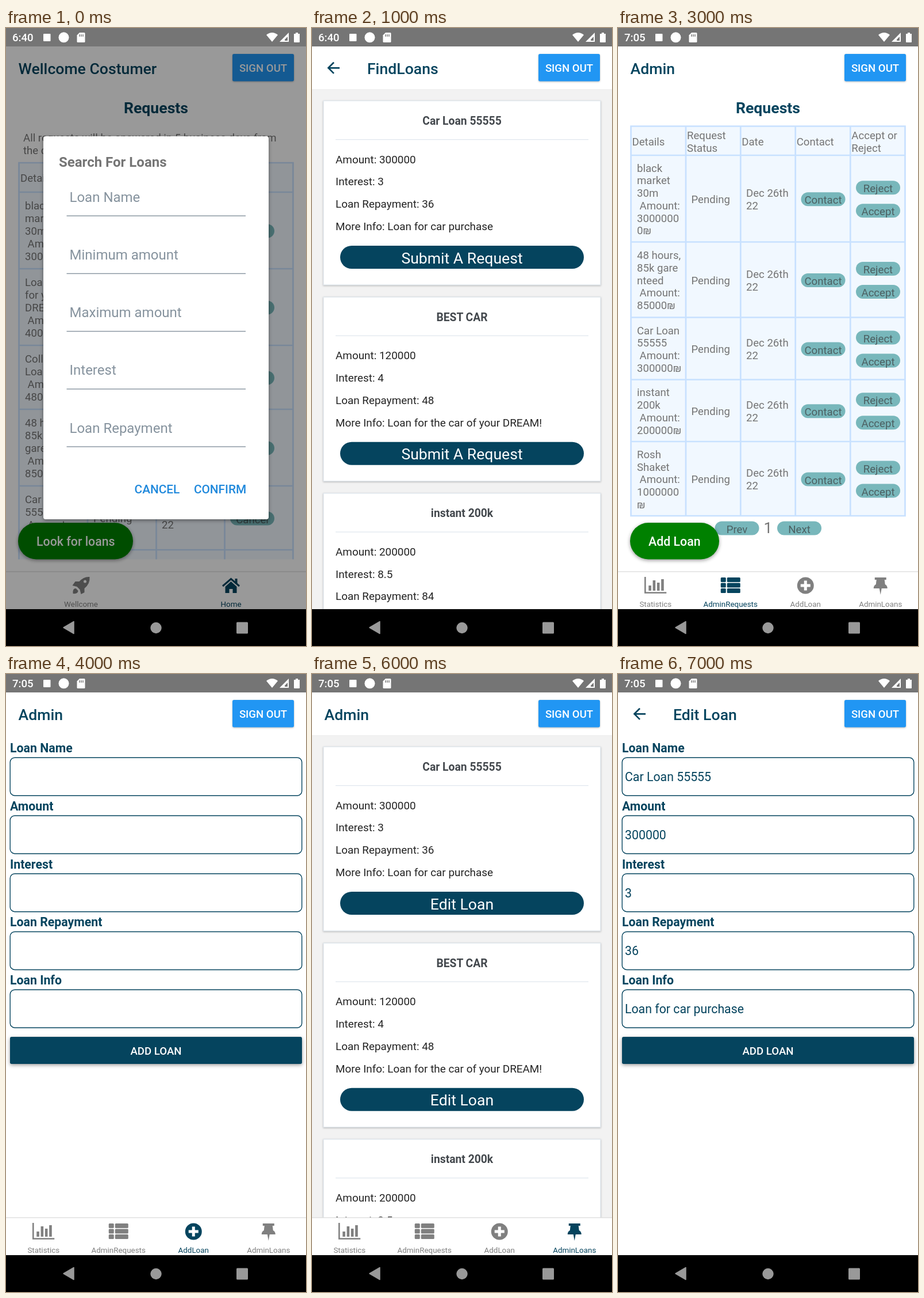
Write an HTML page that moves like this. It is 522 px wide and 1073 px high and loops after 8 s.

```html
<!DOCTYPE html>
<html lang="en">
<head>
<meta charset="utf-8">
<title>Loan app walkthrough</title>
<style>
  html, body { margin: 0; width: 100%; height: 100%; overflow: hidden; background: #fff; }
  svg { display: block; width: 522px; height: 1073px; }
  text { font-family: Roboto, "Noto Sans", sans-serif; white-space: pre; }
  .low { filter: drop-shadow(0 1px 1.5px #0004); }
  .mid { filter: drop-shadow(0 2px 3px #0006); }
  .high { filter: drop-shadow(0 8px 12px #0008); }
</style>
</head>
<body>
<svg id="stage" viewBox="0 0 522 1073"></svg>
<script>
const NAVY = '#05445e', GREY = '#757575', TEAL = '#78b7bb', PAPER = '#f2f2f2';

// Drawing helpers return SVG markup
const text = (x, y, s, size = 18.6, fill = GREY, weight = 400, anchor = 'start') =>
  `<text x="${x}" y="${y}" font-size="${size}" fill="${fill}" font-weight="${weight}" text-anchor="${anchor}">${s}</text>`;
const mid = (x, y, s, size, fill, weight) => text(x, y, s, size, fill, weight, 'middle');
const rect = (x, y, w, h, fill, r = 0, more = '') =>
  `<rect x="${x}" y="${y}" width="${w}" height="${h}" rx="${r}" fill="${fill}" ${more}/>`;
const circle = (x, y, r, fill) => `<circle cx="${x}" cy="${y}" r="${r}" fill="${fill}"/>`;
const path = (d, fill, more = '') => `<path d="${d}" fill="${fill}" ${more}/>`;
const line = (d, color, width) => path(d, 'none', `stroke="${color}" stroke-width="${width}"`);
const at = (x, y, body) => `<g transform="translate(${x} ${y})">${body}</g>`;
const each = (list, draw) => list.map(draw).join('');

const lines = (x, cy, rows, pitch = 21.7) =>
  each(rows, (s, i) => text(x, cy + 7.7 + (i - (rows.length - 1) / 2) * pitch, s));
const pill = (x, cy, label) =>
  rect(x, cy - 11.5, 77, 24, TEAL, 12) + mid(x + 38.5, cy + 8.6, label, 18.6, '#4c6062');

function grid(xs, ys) {
  const [left, right, top, bottom] = [xs[0], xs.at(-1), ys[0], ys.at(-1)];
  return rect(left, top, right - left, bottom - top, '#f1f8ff') +
    line(each(xs, x => `M${x} ${top - 1.3}V${bottom + 1.3}`) + each(ys, y => `M${left} ${y}H${right}`), '#c8e1ff', 2.7);
}

const status = time => rect(0, 0, 522, 32, GREY) + text(11, 23, time, 18.6, '#fff', 500) +
  rect(65, 10, 12.5, 13, '#fff', 1) + circle(100.5, 16.3, 9, '#fff') +
  path('M128 8h8q1.5 0 1.5 1.5v14q0 1.500-1.500 1.500h-11q-1.500 0-1.500-1.500v-11z', '#fff') +
  line('M128 11v4M131 11v4M134 11v4', GREY, 1.4) +
  path('M453 12q10-8 20 0l-10 12z', '#fff') +
  path('M492 8v16h-16z', '#fff') + path('M490 15v7h-5v-2z', GREY) +
  path('M501 10h3v-2h4v2h3v14q0 1-1 1h-8q-1 0-1-1z', '#fff');

const navBar = rect(0, 1009, 522, 64, '#000') +
  path('M100 1041l18-10.500v21z', '#999', 'stroke="#999" stroke-width="1.500" stroke-linejoin="round"') +
  circle(261, 1041.5, 9.7, '#999') + rect(401, 1031.5, 20, 20, '#999', 1.5);

const header = (title, back) => rect(0, 32, 522, 74.5, '#fff') +
  (back ? line('M48 69.300H28.500M38 59.700l-9.600 9.600 9.600 9.600', NAVY, 2.7) : '') +
  text(back ? 96 : 21.5, 79.5, title, 26.6, NAVY, 500) +
  rect(394, 45, 107, 47.5, '#2196f3', 2.7, 'class="low"') +
  mid(447.5, 76.3, 'SIGN OUT', 18.6, '#fff', 500);

const page = (time, title, back, bg, body) =>
  rect(0, 0, 522, 1073, bg) + body +
  (bg === PAPER ? rect(0, 106, 522, 1.3, '#e6e6e6') : '') +
  header(title, back) + status(time);

// Tab icons, centred on their own origin
const icons = {
  Wellcome: c => path('M15-15q1 12-9 20v7l-6 3-2-8-5-5-8-2 5-7h7q8-9 18-8z', c) +
    path('M-14 14q-1-9 5-9l4 4q0 6-9 5z', c) + circle(7, -7, 2.5, '#fff'),
  Home: c => line('M-14.500 1L0-11.500 14.500 1', c, 3) + rect(7, -12, 4, 9, c) +
    path('M-10 2L0-7 10 2v11H3V6H-3v7h-7z', c),
  Statistics: c => line('M-18-15v27.500h37', c, 2.6) +
    each([9, 18, 14, 20], (h, i) => rect(-12 + i * 7.3, 9 - h, 4.6, h, c)),
  AdminRequests: c => each([-14, -4.5, 5], y => rect(-17, y, 9, 8, c, 1.5) + rect(-6, y, 23, 8, c, 1.5)),
  AddLoan: c => circle(0, 0, 14.5, c) + line('M-8.500 0h17M0-8.500v17', '#fff', 5),
  AdminLoans: c => path('M-10-14h20v4h-3l1 8q4 2 4 7H2l-2 11-2-11h-10q0-5 4-7l1-8h-3z', c),
};
function tabs(names, active) {
  const width = 522 / names.length;
  return rect(0, 944, 522, 65, '#fff') + rect(0, 943.3, 522, 1.3, '#dcdcdc') + each(names, (name, i) => {
    const x = width * (i + 0.5), color = name === active ? NAVY : '#808080';
    return at(x, 968, icons[name](color)) + mid(x, 1005, name, 13.4, color);
  });
}
const adminTabs = active => tabs(['Statistics', 'AdminRequests', 'AddLoan', 'AdminLoans'], active);

const roundButton = (w, label) =>
  rect(21, 859, w, 63.5, '#008000', 31.7, 'class="mid"') + text(53, 899, label, 21.3, '#fff', 500);
const heading = mid(261, 148, 'Requests', 26.6, NAVY, 700);

function customerRequests() {
  const ys = [234, 285, 418, 551, 662, 795, 906, 1000];
  const details = [
    ['black', 'market', '30m', ' Amount:', '30000000₪'],
    ['Loan', 'for your', 'DREAM', ' Amount:', '400000₪'],
    ['College', 'Loan', ' Amount:', '48000₪'],
    ['48 hours,', '85k', 'garenteed', ' Amount:', '85000₪'],
    ['Car Loan', '55555', ' Amount:', '300000₪'],
  ];
  const body = heading +
    text(30, 197, 'All requests will be answered in 5 business days from') +
    text(30, 219, 'the creation date') +
    grid([22.5, 142, 261.5, 380.5, 499.5], ys) + lines(25, 259.5, ['Details']) +
    each(details, (rows, i) => {
      const cy = (ys[i + 1] + ys[i + 2]) / 2;
      return lines(33, cy, rows, 22) + lines(152, cy, ['Pending']) +
        lines(271, cy, ['Dec 26th', '22']) + pill(390, cy + 0.5, 'Cancel');
    }) +
    rect(0, 922.5, 522, 30, '#fff') + roundButton(200, 'Look for loans') + tabs(['Wellcome', 'Home'], 'Home');
  const fields = ['Loan Name', 'Minimum amount', 'Maximum amount', 'Interest', 'Loan Repayment'];
  return page('6:40', 'Wellcome Costumer', false, '#fff', body) +
    rect(0, 32, 522, 977, '#0006') + rect(65, 188, 392, 665, '#fff', 4, 'class="mid"') +
    text(92, 240.5, 'Search For Loans', 24, GREY, 700) +
    each(fields, (s, i) => text(110.5, 301.7 + i * 100.2, s, 24, '#86939e') +
      rect(105.5, 325.5 + i * 100.2, 311.5, 1.4, '#86939e')) +
    mid(263, 808.3, 'CANCEL', 20.8, '#2089dc', 500) + mid(372.5, 808.3, 'CONFIRM', 20.8, '#2089dc', 500);
}

const loans = [
  ['Car Loan 55555', 300000, 3, 36, 'Loan for car purchase'],
  ['BEST CAR', 120000, 4, 48, 'Loan for the car of your DREAM!'],
  ['instant 200k', 200000, 8.5, 84, 'Loan in an instant'],
];
const loanCards = action => each(loans, ([name, amount, interest, months, info], i) => {
  const rows = ['Amount: ' + amount, 'Interest: ' + interest, 'Loan Repayment: ' + months, 'More Info: ' + info];
  return at(0, i * 340.7,
    rect(20, 126.5, 482, 319.5, '#fff', 0, 'stroke="#e1e8ee" stroke-width="1.300" class="low"') +
    mid(261, 168, name, 19.3, '#43484d', 700) + rect(41, 193, 440, 1.3, '#e1e8ee') +
    each(rows, (s, k) => text(41, 234.5 + k * 38.8, s, 18.9, '#242424')) +
    rect(49, 378, 424, 40, NAVY, 20) + mid(261, 408.5, action, 26.6, '#fff'));
});
const findLoans = () => page('6:40', 'FindLoans', true, PAPER, loanCards('Submit A Request'));

const submitted = () => findLoans() + rect(0, 0, 522, 1009, '#0009') +
  rect(35, 414, 452, 213.5, '#fff', 3, 'class="high"') +
  text(66.5, 463.5, 'Request submited successfully!', 24, '#212121', 500) +
  mid(429, 593.7, 'OK', 18.6, '#00897b', 500);

function adminRequests() {
  const xs = [22.5, 118, 213.3, 308.7, 404.3, 499.5], ys = [170.5, 221, 371.5, 502.5, 610.5, 718, 847];
  const heads = [['Details'], ['Request', 'Status'], ['Date'], ['Contact'], ['Accept or', 'Reject']];
  const details = [
    ['black', 'market', '30m', ' Amount:', '3000000', '0₪'],
    ['48 hours,', '85k gare', 'nteed', ' Amount:', '85000₪'],
    ['Car Loan', '55555', ' Amount:', '300000₪'],
    ['instant', '200k', ' Amount:', '200000₪'],
    ['Rosh', 'Shaket', ' Amount:', '1000000', '₪'],
  ];
  const body = heading + grid(xs, ys) +
    each(heads, (rows, i) => lines(xs[i] + 2, 196, rows, 22)) +
    each(details, (rows, i) => {
      const cy = (ys[i + 1] + ys[i + 2]) / 2;
      return lines(33, cy, rows) + lines(127.5, cy, ['Pending']) + lines(223, cy, ['Dec 26th', '22']) +
        pill(318.5, cy + 0.5, 'Contact') + pill(414, cy - 19.5, 'Reject') + pill(414, cy + 20.5, 'Accept');
    }) +
    pill(168.5, 868, 'Prev') + mid(261, 876.5, '1', 26.6, GREY) + pill(277, 868, 'Next') +
    roundButton(155, 'Add Loan') + adminTabs('AdminRequests');
  return page('7:05', 'Admin', false, '#fff', body);
}

function statistics() {
  const parts = [[5, 'Accepted', '#00f'], [19, 'Pending', '#808080'], [3, 'Rejected', '#000']];
  const total = 27, radius = 143;
  const rim = n => {
    const a = n / total * 2 * Math.PI;
    return `${radius * Math.sin(a)} ${-radius * Math.cos(a)}`;
  };
  let sum = 0;
  const body = mid(261, 143, 'Requests', 21.3, NAVY) + each(parts, ([n, label, color], i) => {
    const start = rim(sum), end = rim(sum += n), y = 234 + i * 95.5;
    return at(150.5, 351, path(`M0 0L${start}A${radius} ${radius} 0 ${+(n > total / 2)} 1 ${end}z`, color)) +
      circle(338, y, 10.7, color) + text(359, y + 6, `${n} ${label}`, 19.9, '#000');
  });
  return page('7:05', 'Admin', false, PAPER, body + adminTabs('Statistics'));
}

const labels = ['Loan Name', 'Amount', 'Interest', 'Loan Repayment', 'Loan Info'];
const form = values => each(labels, (label, i) => at(0, i * 100.75,
    text(7, 136, label, 21.3, NAVY, 700) +
    rect(7.2, 145.2, 507.6, 66, '#fff', 8, `stroke="${NAVY}" stroke-width="1.400"`) +
    text(12, 186, values[i] ?? '', 21.3, NAVY))) +
  rect(7, 630, 508, 47, NAVY, 2.7, 'class="mid"') + mid(261, 661, 'ADD LOAN', 18.6, '#fff', 500);

const scenes = [
  customerRequests(),
  findLoans(),
  submitted(),
  adminRequests(),
  page('7:05', 'Admin', false, '#fff', form([]) + adminTabs('AddLoan')),
  statistics(),
  page('7:05', 'Admin', false, PAPER, loanCards('Edit Loan') + adminTabs('AdminLoans')),
  page('7:05', 'Edit Loan', true, '#fff', form(loans[0])),
];

const stage = document.getElementById('stage');
stage.innerHTML = each(scenes, s => `<g display="none">${s}</g>`) + navBar;

let shown = -1;
function tick() {
  const now = Math.floor(performance.now() / 1000) % scenes.length;
  if (now !== shown) {
    scenes.forEach((_, i) => stage.children[i].setAttribute('display', i === now ? 'inline' : 'none'));
    shown = now;
  }
  requestAnimationFrame(tick);
}
tick();
</script>
</body>
</html>
```
